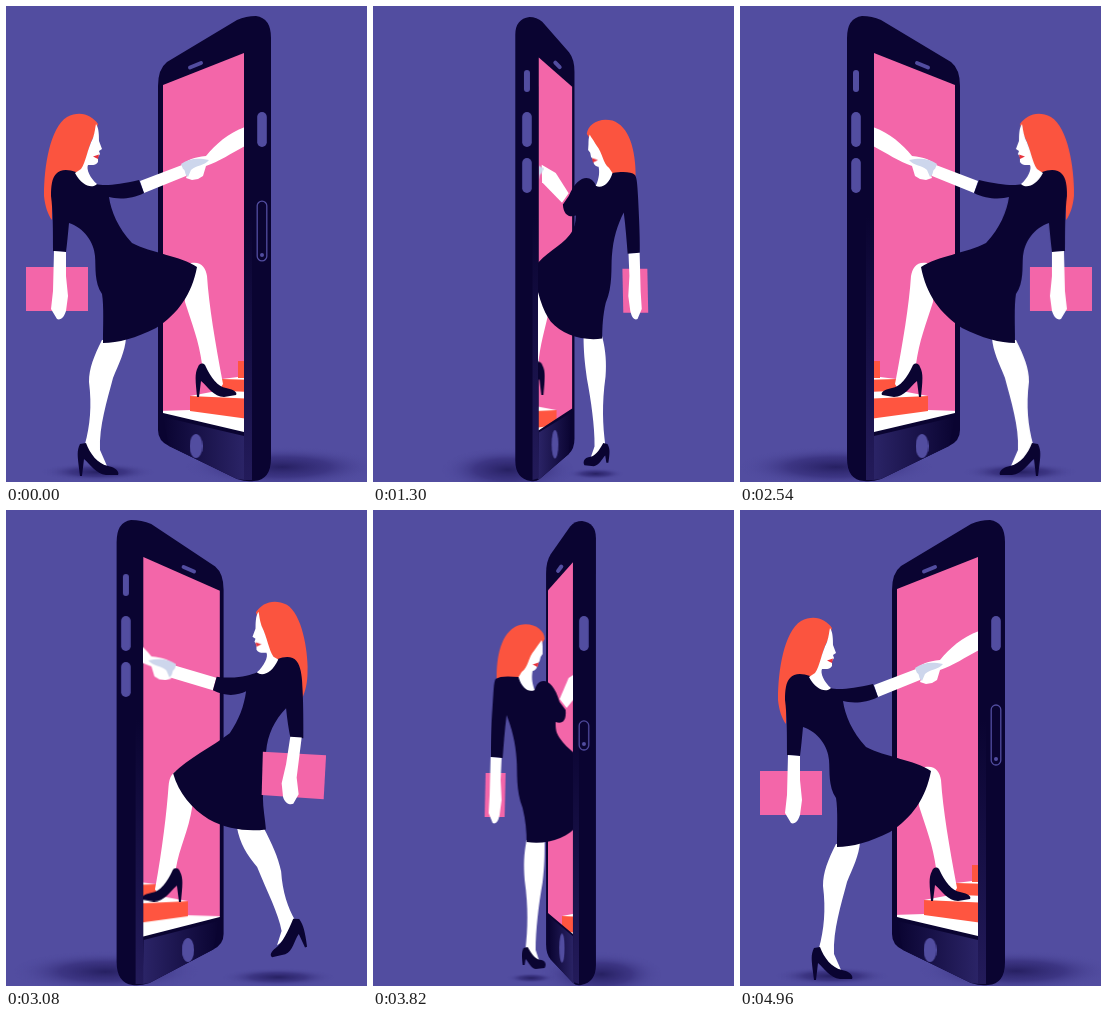
Animation of 361x476 px, one loop 4980 ms. Source, as an HTML page without scripts:

```html
<!DOCTYPE html>
<html lang="en">
<head>
<meta charset="utf-8">
<title>Step into the phone</title>
<style>
html, body { margin: 0; width: 100%; height: 100%; overflow: hidden; background: #524da0; }
svg { display: block; width: 100vw; height: 100vh; }

/* a: rest, b: stepping in, e/f: before and after the turn, c: coming out */
.morph { d: var(--a); animation: morph 4.98s infinite linear; }
.move { transform: var(--a); animation: move 4.98s infinite linear; }
.walk { animation: walk 4.98s infinite linear; }
.flip { animation: flip 4.98s infinite step-end; }
.grow { transform-box: fill-box; transform-origin: center; animation: grow 4.98s infinite linear; }
.tray { fill: none; stroke: #524da0; stroke-width: 1.3; animation: tray 4.98s infinite ease-out; }
.pin { fill: #524da0; animation: pin 4.98s infinite ease-out; }

@keyframes morph {
  0%, 51.7% { d: var(--a); animation-timing-function: cubic-bezier(.36,0,.7,.34); }
  12.85%, 64.55% { d: var(--b); animation-timing-function: cubic-bezier(.5,.35,.8,.7); }
  21.69%, 73.39% { d: var(--e, var(--b)); }
  21.75%, 73.45% { d: var(--f, var(--c)); }
  25.3%, 77% { d: var(--c); animation-timing-function: cubic-bezier(.28,.95,.55,1); }
  48.2%, 99.6%, 100% { d: var(--a); }
}
@keyframes move {
  0%, 51.7% { transform: var(--a); animation-timing-function: cubic-bezier(.36,0,.7,.34); }
  12.85%, 64.55% { transform: var(--b); animation-timing-function: cubic-bezier(.5,.35,.8,.7); }
  21.69%, 73.39% { transform: var(--e, var(--b)); }
  21.75%, 73.45% { transform: var(--f, var(--c)); }
  25.3%, 77% { transform: var(--c); animation-timing-function: cubic-bezier(.28,.95,.55,1); }
  48.2%, 99.6%, 100% { transform: var(--a); }
}
@keyframes walk {
  0%, 12.85%, 51.7%, 64.55% { transform: translate(0, 0); }
  21.69%, 73.39% { transform: translate(95px, -16px); }
  21.75%, 73.45% { transform: translate(60px, 0); }
  25.3%, 48.2%, 77%, 100% { transform: translate(0, 0); }
}
@keyframes flip {
  0%, 73.42% { transform: none; }
  21.72% { transform: matrix(-1, 0, 0, 1, 372, 0); }
}
@keyframes grow {
  0%, 10% { transform: scale(0, 0); }
  12.85% { transform: scale(.62, .18); }
  21.7%, 66% { transform: scale(1, 1); }
  73%, 100% { transform: scale(0, 0); }
}
@keyframes tray {
  0%, 95%, 100% { y: 195px; height: 60px; opacity: 1; }
  12.85% { y: 214px; height: 21px; opacity: 1; }
  17%, 71% { y: 220px; height: 10px; opacity: 0; }
  76.71% { y: 211px; height: 29px; opacity: 1; }
}
@keyframes pin {
  0%, 95%, 100% { cy: 249px; opacity: 1; }
  10%, 71% { cy: 230px; opacity: 0; }
  76.71% { cy: 234px; opacity: 1; }
}
</style>
</head>
<body>
<svg viewBox="0 0 361 476" preserveAspectRatio="none">
  <defs>
    <radialGradient id="shade">
      <stop offset="0" stop-color="#1c1552" stop-opacity=".8"/>
      <stop offset=".5" stop-color="#281f68" stop-opacity=".5"/>
      <stop offset="1" stop-color="#524da0" stop-opacity="0"/>
    </radialGradient>
    <linearGradient id="sheen">
      <stop offset="0" stop-color="#0a0431"/>
      <stop offset="1" stop-color="#2b2467"/>
    </linearGradient>
    <linearGradient id="edge" x2="0" y2="1">
      <stop offset="0" stop-color="#0a0431"/>
      <stop offset="1" stop-color="#231b5a"/>
    </linearGradient>
    <clipPath id="glass">
      <path class="morph" style="--a:path('M157 79L238 47L238 426L157 407Z');--b:path('M159 82L232.5 47L232.5 427L159 407Z');--e:path('M175 70L175 55L175 424L175 415Z');--f:path('M175 70L175 55L175 424L175 415Z');--c:path('M175 81L202 52L202 424L175 402Z')"/>
    </clipPath>
    <clipPath id="outside">
      <path class="morph" style="--a:path('M-99 0L238 0L238 476L-99 476Z');--b:path('M-99 0L232.5 0L232.5 476L-99 476Z');--e:path('M-99 0L175 0L175 476L-99 476Z');--f:path('M-99 0L175 0L175 476L-99 476Z');--c:path('M-99 0L202 0L202 476L-99 476Z')"/>
    </clipPath>
  </defs>

  <rect width="361" height="476" fill="#524da0"/>

  <g class="flip">
    <!-- ground shadows -->
    <g fill="url(#shade)">
      <circle class="move" r="1" style="--a:translate(276px,461px) scale(96,20);--b:translate(270px,462px) scale(90,20);--e:translate(186px,466px) scale(40,18);--f:translate(186px,466px) scale(40,18);--c:translate(232px,464px) scale(62,22)"/>
      <circle class="move" r="1" style="--a:translate(92px,466px) scale(56,9);--b:translate(105px,468px) scale(55,9);--e:translate(150px,468px) scale(30,6);--f:translate(170px,468px) scale(18,4);--c:translate(157px,468px) scale(24,5)"/>
    </g>

    <!-- phone -->
    <path class="morph" fill="#0a0431" style="--a:path('M152 80Q152 63 161 56L231 14Q240 10 250 10Q265 12 265 32L265 452Q265 474 248 475Q240 476 231 473L163 440Q152 435 152 424Z');--b:path('M156 80Q156 64 164 57L224 14Q234 10 245 10Q259 12 259 32L259 452Q259 472 244 475Q236 476 227 473L166 439Q156 434 156 424Z');--e:path('M174 60Q174 46 174 36L175 22Q178 11 186 11Q198 12 198 28L198 455Q198 472 186 475Q180 476 178 473L175 456Q174 450 174 440Z');--f:path('M174 60Q174 46 174 36L175 22Q178 11 186 11Q198 12 198 28L198 455Q198 472 186 475Q180 476 178 473L175 456Q174 450 174 440Z');--c:path('M173 64Q173 52 178 45L199 16Q204 11 211 11Q225 13 225 28L225 455Q225 472 210 475Q205 476 202 473L178 449Q173 444 173 434Z')"/>
    <path class="morph" fill="url(#sheen)" style="--a:path('M157 411L238 430L239 474L231 473L163 440Z');--b:path('M161 411L232 430L233 474L227 473L166 439Z');--e:path('M175 410L176 430L178 473L177 473L175 455Z');--f:path('M175 410L176 430L178 473L177 473L175 455Z');--c:path('M176 406L202 426L203 473L202 473L178 449Z')"/>
    <path class="morph" fill="url(#edge)" style="--a:path('M238 210L246 210L246 474L238 474Z');--b:path('M232.5 210L240 210L240 474L232.5 474Z');--e:path('M176 210L182 210L182 474L178 472Z');--f:path('M176 210L182 210L182 474L178 472Z');--c:path('M202 210L208 210L208 474L202 472Z')"/>
    <path class="morph" fill="none" stroke="#524da0" stroke-width="4" stroke-linecap="round" style="--a:path('M184 61.5L195 57');--b:path('M184 61.5L194 57');--e:path('M180 60L180 57');--f:path('M180 60L180 57');--c:path('M185.5 61L189 56.5')"/>
    <circle class="move" r="1" fill="#524da0" style="--a:translate(190px,440px) scale(6.5,12);--b:translate(190px,440px) scale(6,12);--e:translate(177px,438px) scale(.01,14);--f:translate(177px,438px) scale(.01,14);--c:translate(190px,438px) scale(3,14.5)"/>
    <g class="move" fill="#524da0" style="--a:translate(256px,0);--b:translate(249.5px,0);--e:translate(186px,0);--f:translate(186px,0);--c:translate(213px,0)">
      <rect x="-4.8" y="106" width="9.6" height="35" rx="4.8"/>
      <rect class="grow" x="-3" y="64" width="6" height="22" rx="3"/>
      <rect class="grow" x="-4.8" y="152" width="9.6" height="35" rx="4.8"/>
      <rect class="tray" x="-4.8" y="195" width="9.6" height="60" rx="4.8"/>
      <circle class="pin" cy="249" r="2"/>
    </g>

    <!-- screen and stairs -->
    <g clip-path="url(#glass)">
      <rect width="361" height="476" fill="#f366a9"/>
      <g class="move" style="--a:translate(0,0);--b:translate(10px,2px);--c:translate(5px,16px)">
        <path fill="#fff" d="M120 406L184 404L250 413V445L120 410ZM184 390L216 384L250 386V399L184 392ZM216 373L232 371H250V375H216Z"/>
        <path fill="#ff5540" d="M184 390L250 393V414L184 405ZM216 373L250 374V386L216 385ZM232 355H250V372H232Z"/>
      </g>
    </g>

    <!-- woman -->
    <g clip-path="url(#outside)">
      <g class="walk">
        <!-- legs -->
        <g fill="#fff">
          <path class="morph" style="--a:path('M96 334C88 350 83 362 83 376C86 400 84 420 79 438C84 450 92 458 101 460L94 444C93 420 101 395 107 372C113 357 119 346 120 332Z');--b:path('M127 306C117 325 112 335 106 352C102 370 94 384 86 391C88 402 94 412 101 419L98 406C104 392 117 374 130 347C143 337 151 325 155 307Z');--c:path('M149 330C146 345 146 355 147 370C151 398 150 420 148 438C150 446 155 450 162 452L158 440C158 420 161 395 165 372C167 355 167 345 167 330Z')"/>
          <path class="morph" style="--a:path('M185 257C195 255 200 262 201 270C203 300 209 335 217 378L214 383C205 378 198 370 196 358C193 335 186 318 179 296L178 270Z');--b:path('M205 262C213 264 215 272 215 280C217 305 220 340 227 380L224 385C215 380 208 370 206 358C203 340 192 325 190 296L190 275Z');--c:path('M210 262C216 264 220 272 220 280C222 305 223 340 229 380L226 385C217 380 210 370 208 358C207 340 202 325 197 300L197 275Z')"/>
        </g>
        <!-- shoes -->
        <g fill="#0a0431">
          <path class="morph" style="--a:path('M74 438C70 446 72 452 74 470L76 470L78 453C84 458 90 468 100 469L112 469C114 465 108 461 102 460C92 458 84 448 80 437Z');--b:path('M82 390C77 396 74 402 69 415L71 416L80 405C84 412 82 424 88 428L102 433C106 432 105 428 103 424C98 416 94 404 88 390Z');--c:path('M146 438C143 443 144 448 145 455L147 455L148 449C151 452 153 458 158 459L167 458C169 455 168 451 164 450C158 450 154 444 150 437Z')"/>
          <path class="move" d="M192 361C188 368 190 378 191 391L193 391L195 375C201 380 208 391 218 391L230 389C232 386 226 383 220 382C212 381 205 372 199 359C196 356 193 358 192 361Z" style="--a:translate(0,0);--b:translate(10px,1px);--c:translate(12px,-2px)"/>
        </g>

        <path class="morph" fill="#fb543f" style="--a:path('M92 118C86 109 74 104 61 111C44 122 38 160 38 190C39 200 42 209 46 214C46 198 46 182 50 172L76 167C82 150 82 140 88 130Z');--b:path('M142 92C136 82 124 78 111 84C96 94 91 130 92 148C92 160 95 168 97 174C98 164 98 154 102 144L127 139C131 123 132 113 138 103Z');--c:path('M167 129C167 120 156 112 142 115C126 120 119 140 119 168C119 170 119 170 119 170C119 170 120 170 122 170L146 168C152 156 154 148 160 140Z')"/>
        <path class="morph" fill="#fff" style="--a:path('M134 175L176 159L183 165L180 170L138 187Z');--b:path('M180 163L221 153L230 160L226 166L183 176Z');--c:path('M182 189L191 168L206 158L206 177L189 198Z')"/>
        <path class="morph" fill="#0a0431" style="--a:path('M50 168C54 163 62 163 70 166C76 176 84 181 90 178C98 180 112 179 133 174L138 187C125 194 110 193 103 191C105 205 112 222 126 237C145 247 175 250 191 261C186 288 172 308 150 322C130 332 112 337 97 337C97 320 98 300 96 288C88 276 90 262 89 250C88 236 78 222 63 217C62 228 61 238 60 246L47 245C47 225 47 205 45 190C45 180 46 172 50 168Z');--b:path('M102 140C106 135 113 135 121 138C126 149 134 156 141 152C148 156 160 163 180 162L183 176C172 182 160 181 151 175C153 190 157 202 163 214C180 230 200 247 214 265C208 280 196 292 182 301C165 311 142 312 122 308C124 297 128 288 127 278C124 262 128 248 127 236C126 218 120 202 111 186C110 197 108 207 106 215L93 217C93 198 93 180 96 165C97 155 98 146 102 140Z');--c:path('M118 169C122 166 130 166 141 167C143 176 150 182 157 180C161 166 175 167 182 192L188 200C189 212 184 214 178 212C178 218 178 222 182 228C190 240 203 246 214 262C212 285 206 305 200 315C190 328 170 335 149 332C149 322 148 310 145 298C138 280 140 262 139 250C138 232 134 218 129 205C127 220 126 235 125 248L113 247C113 225 114 210 115 195C116 182 116 172 118 169Z')"/>
        <path class="morph" fill="#fff" style="--a:path('M90 118C93 122 93 130 93 135L96 143L93 145L94 148L92 151L92 156C90 160 85 159 82 159C80 163 84 172 91 178C86 183 76 180 69 167L75 163C80 156 81 144 87 132C89 126 89 122 90 118Z');--b:path('M139 91C142 95 142 103 142 108L145 116L142 118L143 121L141 124L141 129C139 133 134 132 131 132C129 136 134 146 141 152C136 156 126 153 120 138L124 136C129 129 130 117 136 105C138 99 138 95 139 91Z');--c:path('M164 130C165 133 165 136 165 139L165 144L163 147L162 151L160 154L159 158C157 161 155 161 155 161C154 166 154 172 157 180C151 183 144 178 141 167L144 162C151 157 150 148 157 140C161 134 163 132 164 130Z')"/>
        <path class="move" fill="#e8323c" d="M87 150.500L93 148.500L92 153Z" style="--a:translate(0,0);--b:translate(49px,-27px);--c:translate(68px,4px)"/>

        <!-- folder and near arm -->
        <path class="morph" fill="#f366a9" style="--a:path('M20 261L82 261L82 305L20 305Z');--b:path('M73 235L137 229L139 272L77 279Z');--c:path('M108 263L128 263L127 307L107 307Z')"/>
        <path class="morph" fill="#fff" style="--a:path('M48 245L60 246L60 270L62 290L60 305C57 314 53 314 51 313L45 303L47 285Z');--b:path('M95 216L106 214L113 244L119 262L118 275C116 282 110 282 107 281L102 272L104 256Z');--c:path('M113 247L124 248L123 270L124 290L122 305C120 314 117 314 115 313L111 303L112 285Z')"/>

        <!-- helping hand -->
        <g class="move" style="--a:translate(0,0);--b:translate(44px,-6px);--c:translate(30px,5px)">
          <path fill="#fff" d="M310 90L239 121C222 127 210 138 200 150C188 151 181 154 176 159C177 163 180 164 183 164L180 172L186 174L192 173L197 170L200 160C212 156 226 147 239 140L310 118Z"/>
          <path fill="#cdd6ec" d="M175 158C184 152 192 152 203 154C198 160 190 159 185 164L182 171C178 168 180 164 177 163Z"/>
        </g>
      </g>
    </g>
  </g>
</svg>
</body>
</html>
```
